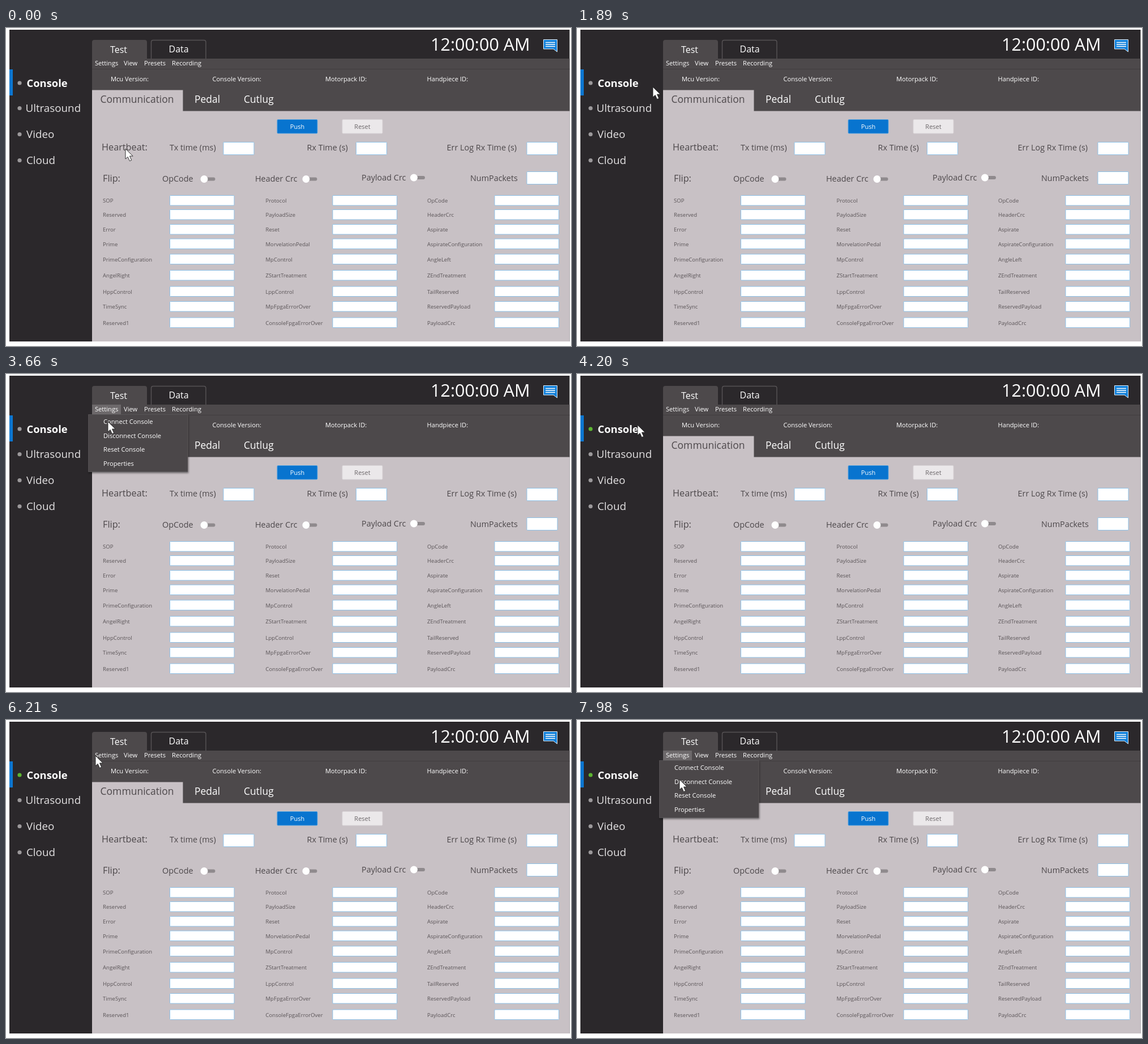
Animation of 998x561 px, one loop 8 s. Source, as an HTML page:

```html
<!DOCTYPE html>
<html lang="en">
<head>
<meta charset="utf-8">
<title>Console test panel</title>
<style>
  html, body { margin: 0; width: 100%; height: 100%; overflow: hidden; background: #fff; }
  svg { display: block; width: 998px; height: 561px; }
  text { font-family: "Open Sans", "Noto Sans", sans-serif; white-space: pre; }

  .light { fill: #fff; }
  .nav { fill: #e4e2e3; font-size: 18.8px; }
  .nav.on { fill: #fff; font-size: 18.4px; font-weight: 700; }
  .clock { fill: #fff; font-size: 30.5px; }
  .tab { fill: #fff; font-size: 16px; }
  .sub { fill: #fff; font-size: 17.5px; }
  .menu { fill: #fff; font-size: 11.15px; }
  .group { fill: #4d484b; font-size: 16.3px; }
  .label { fill: #4d484b; font-size: 14.4px; }
  .cell { fill: #5a5457; font-size: 9.55px; }
  .button { font-size: 11px; text-anchor: middle; }
  .field { fill: #fff; stroke: #8dc1e8; }

  .cursor { animation: move 8s ease-in-out infinite; }
  .popup { animation: popup 8s step-end infinite; }
  .status { fill: #9c999b; animation: status 8s step-end infinite; }

  @keyframes move {
    0% { transform: translate(211px, 213px); }
    10.5%, 12.5% { transform: translate(203px, 213px); }
    23.625% { transform: translate(134px, 104px); }
    30.375%, 36% { transform: translate(177px, 65px); }
    41.25%, 46.875% { transform: translate(180px, 84px); }
    52.5%, 67.5% { transform: translate(107px, 90px); }
    77.25%, 80.625% { transform: translate(158px, 63px); }
    84%, 87% { transform: translate(177px, 65px); }
    95%, 100% { transform: translate(181px, 105px); }
  }
  @keyframes popup {
    0% { opacity: 0; }
    31.875% { opacity: 1; }
    46.875% { opacity: 0; }
    84.375%, 100% { opacity: 1; }
  }
  @keyframes status {
    0% { fill: #9c999b; }
    46.875%, 100% { fill: #5cb531; }
  }
</style>
</head>
<body>
<svg viewBox="0 0 998 561" xmlns="http://www.w3.org/2000/svg">
  <defs>
    <filter id="shadow" x="-10%" y="-10%" width="120%" height="125%">
      <feDropShadow dx="1" dy="2" stdDeviation="1.5" flood-color="#000" flood-opacity=".45"/>
    </filter>
  </defs>

  <path d="M6 3H995.500V553H6Z" fill="#2b282b"/>
  <path d="M152 54H995.500V147H152Z" fill="#4d494b"/>
  <path d="M152 72.500H995.500" stroke="#423e40"/>
  <path d="M152 147V109.500H312.500V146.500H995.500V553H152Z" fill="#c8c1c5"/>

  <path d="M152 55V25Q152 21 156 21H245Q249 21 249 25V55Z" fill="#4d494b"/>
  <path d="M256.500 54V25Q256.500 21.500 260 21.500H349.500Q353 21.500 353 25V54" fill="none" stroke="#565254" stroke-width="1.500"/>
  <path d="M6 73H12V119H6Z" fill="#0a76d0"/>
  <path d="M949.500 20.500H973.500V42L967 37H949.500Z" fill="#1180da" stroke="#e6f1fb"/>
  <path d="M953 25.500H970M953 29H970M953 32.500H970" stroke="#fff" stroke-width="1.400"/>

  <g id="panel"></g>

  <rect x="479" y="161.500" width="71" height="24.500" rx="1.500" fill="#0874cf" stroke="#5ba5df"/>
  <rect x="594" y="161.500" width="71" height="24.500" rx="1.500" fill="#ebe8ea" stroke="#d9d4d7"/>
  <text class="button light" x="514.500" y="177.500">Push</text>
  <text class="button" x="629.500" y="177.500" fill="#6a6568">Reset</text>

  <g class="popup">
    <path d="M152 54H203V71H152Z" fill="#6d696b"/>
    <text class="menu" x="157" y="66">Settings</text>
    <path d="M145.500 71.500H321V172.500H145.500Z" fill="#4b4749" stroke="#5f5b5d" stroke-width=".7" filter="url(#shadow)"/>
    <g id="items"></g>
  </g>

  <path class="cursor" d="M0 0V18L4.200 14.400L7.400 21.600L10.700 20.200L7.500 13H13.200Z" fill="#fff" stroke="#222" stroke-width=".9"/>
</svg>

<script>
  const panel = document.getElementById('panel');

  function add(parent, tag, attrs, content = '') {
    const el = document.createElementNS('http://www.w3.org/2000/svg', tag);
    for (const key in attrs) el.setAttribute(key, attrs[key]);
    el.textContent = content;
    parent.append(el);
  }

  const text = (cls, x, y, content, parent = panel) =>
    add(parent, 'text', { class: cls, x, y }, content);

  const field = (x, y, width, height) =>
    add(panel, 'rect', { class: 'field', x, y, width, height, rx: 1 });

  function toggle(x, y) {
    add(panel, 'rect', { x, y: y - 3, width: 19.5, height: 6, rx: 3, fill: '#8f8a8d' });
    add(panel, 'circle', { cx: x, cy: y, r: 6.5, fill: '#fff' });
  }

  [['Console', 36.5, 103.5], ['Ultrasound', 34.5, 148], ['Video', 36, 194], ['Cloud', 36, 240]]
    .forEach(([name, x, y], i) => {
      text(i ? 'nav' : 'nav on', x, y, name);
      add(panel, 'circle', { class: i ? '' : 'status', cx: 24, cy: y - 6.5, r: 3.6, fill: '#9c999b' });
    });

  text('clock', 750, 39.5, '12:00:00 AM');
  text('tab', 184, 43.5, 'Test');
  text('tab', 287.5, 43, 'Data');

  [['Settings', 157], ['View', 208], ['Presets', 244], ['Recording', 293]]
    .forEach(([name, x]) => text('menu', x, 66, name));
  [['Mcu Version:', 185], ['Console Version:', 364.5], ['Motorpack ID:', 564], ['Handpiece ID:', 743.5]]
    .forEach(([name, x]) => text('menu', x, 93.5, name));
  [['Pedal', 333], ['Cutlug', 420]].forEach(([name, x]) => text('sub', x, 132, name));
  add(panel, 'text', { class: 'sub', x: 166.5, y: 132, style: 'fill:#4d484b' }, 'Communication');

  text('group', 169, 215.5, 'Heartbeat:');
  [['Tx time (ms)', 289, 384], ['Rx Time (s)', 531.5, 618.5], ['Err Log Rx Time (s)', 778.5, 920]]
    .forEach(([name, x, box]) => {
      text('label', x, 216, name);
      field(box, 201.5, 54, 22);
    });

  text('group', 171, 271, 'Flip:');
  [['OpCode', 276, 350, 266.5], ['Header Crc', 440, 530, 266.5], ['Payload Crc', 628, 720.5, 264]]
    .forEach(([name, x, knob, y]) => {
      text('label', x, y === 264 ? 268.5 : 270.5, name);
      toggle(knob, y);
    });
  text('label', 820, 269.5, 'NumPackets');
  field(920, 253.5, 54, 22);

  const rows = [304.5, 329.5, 355.5, 381, 408, 436.5, 465, 491.5, 520];
  const columns = [
    [171, 289.5, 'SOP Reserved Error Prime PrimeConfiguration AngelRight HppControl TimeSync Reserved1'],
    [458.5, 577, 'Protocol PayloadSize Reset MorvelationPedal MpControl ZStartTreatment LppControl MpFpgaErrorOver ConsoleFpgaErrorOver'],
    [744, 863, 'OpCode HeaderCrc Aspirate AspirateConfiguration AngleLeft ZEndTreatment TailReserved ReservedPayload PayloadCrc']
  ];
  for (const [x, box, names] of columns) {
    names.split(' ').forEach((name, i) => {
      text('cell', x, rows[i] + 3.5, name);
      field(box, rows[i] - 9, 113.5, 17.5);
    });
  }

  const items = document.getElementById('items');
  ['Connect Console', 'Disconnect Console', 'Reset Console', 'Properties']
    .forEach((name, i) => text('menu', 172, 88 + i * 24.6, name, items));
</script>
</body>
</html>
```
